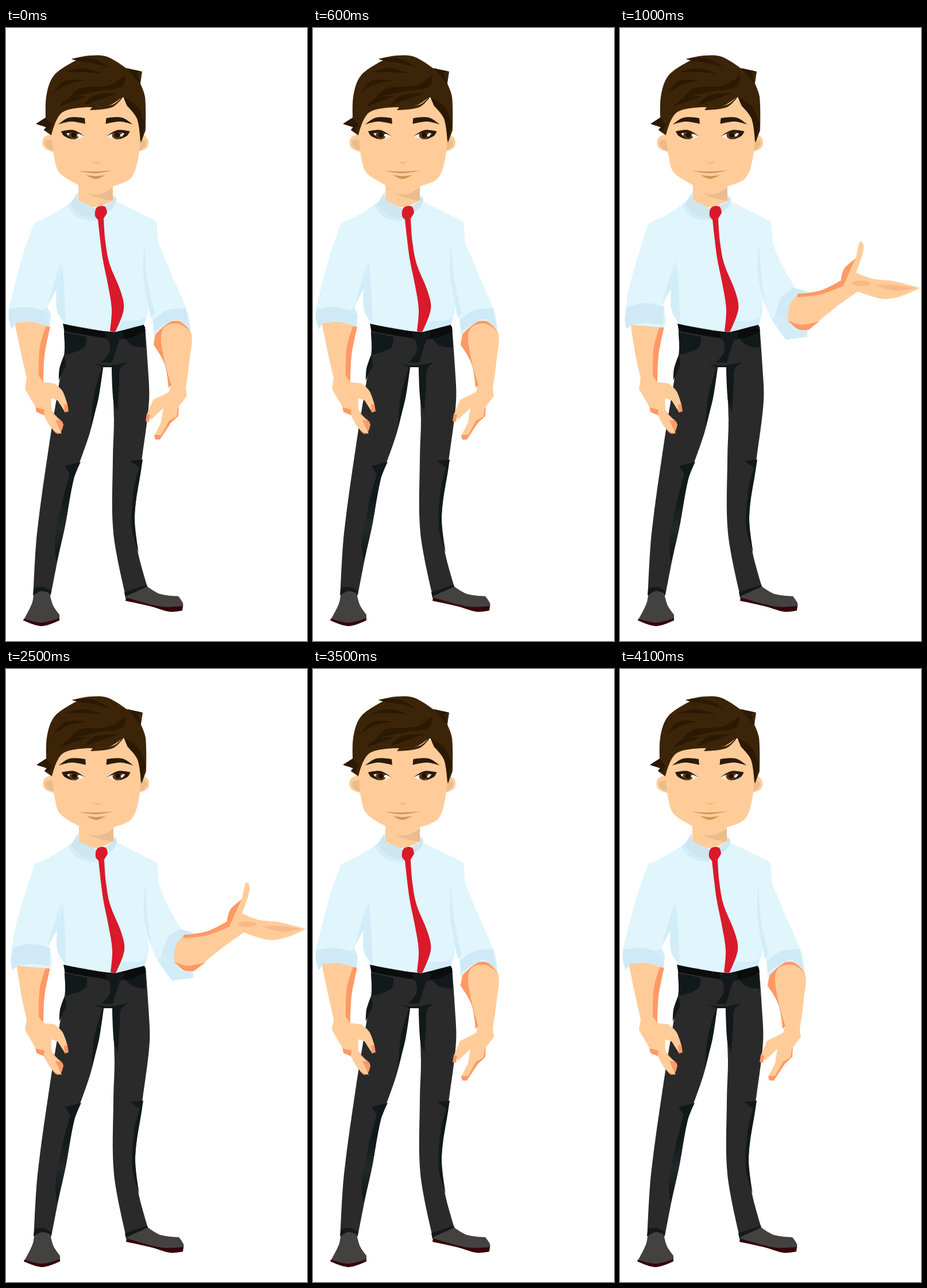
An HTML page with a canvas for the animation above (4500 ms loop, 524 by 1068 pixels).

```html
<!DOCTYPE html>
<html lang="en">
<head>
<meta charset="utf-8">
<title>Presenter</title>
<style>
html, body { margin: 0; width: 100%; height: 100%; overflow: hidden; background: #fff; }
canvas { display: block; }
</style>
</head>
<body>
<canvas id="stage" width="524" height="1068"></canvas>
<script>
const ctx = document.getElementById('stage').getContext('2d');

const SKIN = '#ffcc99', BLUSH = '#ff9966', TAN = '#e9bd8d', LIP = '#cf9656';
const SHIRT = '#e0f5fc', FOLD = '#d2edf8', CUFF = '#cfeaf6', COLLAR = '#cde6ef', TIE = '#d91a2b';
const CLOTH = '#2a2a2a', DEEP = '#11191b', BELT = '#0b0c0c', SHOE = '#444241', SOLE = '#35040a';
const HAIR = '#3c2408', LOCK = '#2b1904', BROW = '#2a1a0b';

const LOOP = 4500, RAISE = 1000, LOWER = 3500;

// Smooth closed outline through the points; "!" marks a sharp corner.
function blob(color, outline) {
  const pts = outline.split(' ').map(s => {
    const [x, y] = s.split(',').map(parseFloat);
    return { x, y, sharp: s.endsWith('!') };
  });
  const at = i => pts[(i + pts.length) % pts.length];
  const handle = (i, reach) => {
    const p = at(i), a = at(i - 1), b = at(i + 1);
    const k = p.sharp ? 0 : reach / (Math.hypot(b.x - a.x, b.y - a.y) || 1);
    return [p.x + (b.x - a.x) * k, p.y + (b.y - a.y) * k];
  };
  ctx.beginPath();
  ctx.moveTo(pts[0].x, pts[0].y);
  pts.forEach((p, i) => {
    const q = at(i + 1);
    const reach = Math.hypot(q.x - p.x, q.y - p.y) / 3;
    ctx.bezierCurveTo(...handle(i, reach), ...handle(i + 1, -reach), q.x, q.y);
  });
  ctx.fillStyle = color;
  ctx.fill();
}

function dot(color, x, y, rx, ry = rx) {
  ctx.fillStyle = color;
  ctx.beginPath();
  ctx.ellipse(x, y, rx, ry, 0, 0, Math.PI * 2);
  ctx.fill();
}

// Draws a part of the face, then the same part reflected.
function bothSides(part) {
  part();
  ctx.save();
  ctx.translate(311.5, 0);
  ctx.scale(-1, 1);
  part();
  ctx.restore();
}

function drawTorso() {
  blob(SKIN, '126,272! 126,300! 155,312 186,301! 186,274!');
  blob(TAN, '127,277! 158,290 186,278! 186,301! 155,294');
  blob(SHIRT, '112,305! 82,324 49,340! 60,430! 88,455! 88,490 104,517! 148,526 190,530! 240,518! 247,495 246,470! 262,440! 262,337! 191,302! 175,321! 157,330!');
  blob(FOLD, '97,403! 101,450 104,516! 90,495 88,455! 75,476! 84,442');
  blob(FOLD, '246,482! 239,506 203,510! 193,529! 240,518!');
  blob(FOLD, '112,304! 157,330! 158,336! 125,330 107,309!');
  blob(COLLAR, '125,286! 112,306! 130,324 157,332! 156,314! 126,300!');
  blob(COLLAR, '186,292! 192,298 187,312 175,321! 171,310! 186,302!');
  blob(TIE, '157,314 165,310 173,312 176,322! 170,332! 160,334! 155,327');
  blob(TIE, '160,333! 170,332! 173,372 180,410 200,460 205,490 190,530! 181,528! 184,490 177,445 168,400');
}

function drawLegs() {
  blob(CLOTH, '100,516! 102,560 92,622 76,720 54,880 48,978! 78,988! 90,926 104,862 115,795 125,765! 146,705 160,645 169,591! 180,530!');
  blob(CLOTH, '165,528! 169,591! 184,591! 188,680 186,750 187,880 209,992! 246,973! 229,910 224,850 236,755 249,650 247,590 242,520! 190,530!');
  blob(DEEP, '101,530! 140,538! 136,557 103,569!');
  blob(DEEP, '207,541! 242,528! 243,557! 220,553');
  blob(DEEP, '173,533! 205,532! 197,545 185,583! 166,583! 180,565 180,548!');
  blob(DEEP, '153,585! 180,588 212,582! 199,593 197,620 194,668! 187,650 184,591! 169,591! 161,645 148,694! 153,640 167,591!');
  blob(DEEP, '101,570! 104,587 98,600 92,614! 93,594');
  blob(DEEP, '216,754! 238,752! 236,765 224,850 231,914! 219,870 223,800 232,766!');
  blob(DEEP, '48,976! 64,974 78,981! 77,990! 47,988!');
  blob(DEEP, '206,983! 245,970! 247,977! 208,993!');
  const shin = ctx.createLinearGradient(0, 820, 0, 920);
  [DEEP, '#23282a', DEEP].forEach((c, i) => shin.addColorStop(i / 2, c));
  blob(shin, '102,763! 130,756! 118,786 103,866 88,930! 85,895 97,830 111,777!');
  blob(BELT, '99,515! 145,525 190,530! 240,517! 243,528! 215,540 180,541 102,528!');
  blob(DEEP, '173,531! 205,530! 203,543! 174,542!');

  blob(SHOE, '48,988! 62,981 76,985! 82,1006 93,1022! 93,1030! 62,1037 31,1031! 41,1012! 46,1000');
  blob(SHOE, '209,990! 246,973! 268,986 300,990! 308,1002 308,1009! 275,1012 209,996!');
  blob(SOLE, '31,1029! 62,1036 93,1028! 93,1032! 62,1042 30,1032!');
  blob(SOLE, '209,992! 270,1008 308,1007! 307,1015! 285,1017 250,1007 208,998!');
}

function drawHead() {
  bothSides(() => {
    blob(SKIN, '82,185! 66,191 66,208 87,217!');
    blob(TAN, '80,194! 68,198 73,210 86,214!');
  });
  blob(SKIN, '76,165! 80,190! 84,226 93,252 125,273! 138,285 155,290 172,285 188,275! 217,262 230,228 234,188! 240,140! 150,100! 84,130!');

  blob(HAIR, '70,173! 70,120 84,82 123,56! 114,54! 145,48 176,50 209,70! 237,76! 234,97! 242,120 243,178! 235,200! 230,160 204,120! 185,138 146,143! 150,138! 98,147 79,187! 66,178!');
  blob(LOCK, '52,167! 69,156! 79,168! 74,179! 66,177! 70,173!');
  blob(LOCK, '114,54! 150,53 181,70! 155,62 123,57!');
  blob(LOCK, '101,77! 133,70 168,79! 133,77');
  blob(LOCK, '83,113! 102,92 137,92! 108,98');
  blob(LOCK, '110,121! 128,105 180,100 208,82! 202,102 160,110');
  blob(LOCK, '92,137! 112,121 141,119!');
  blob(LOCK, '134,135! 155,117 193,114!');
  blob(LOCK, '211,70! 237,76! 229,77! 233,97! 224,86');
  blob(LOCK, '204,120! 230,138 242,168! 234,199! 228,158 211,136!');
  blob(SKIN, '158,138! 182,134 201,121! 187,133');

  bothSides(() => {
    blob(BROW, '91,168! 110,156 137,157! 138,167! 113,163');
    blob('#f7ece2', '101,183! 118,180 136,189! 118,194');
    dot('#5e3b18', 118, 187, 9, 7);
    dot('#211306', 118, 186.5, 4.5);
    blob(BROW, '96,180! 118,178 137,189! 120,182 105,184! 115,194! 101,188');
  });
  dot('#fff', 126, 187, 2.3);
  dot('#fff', 201, 187, 2.3);
  blob('#edb98b', '148,231! 157,234 166,231! 157,237');
  blob(LIP, '125,249! 156,250 187,248! 156,253');
  blob(LIP, '139,256! 156,258 173,256! 156,263');
}

// Hanging arm on the left; only the sleeve differs between the poses.
function drawLeftArm(raised) {
  const edge = raised ? 18 : 15;
  blob(BLUSH, '50,654! 53,669! 67,675! 78,695 92,707 100,690! 75,662!');
  blob(SKIN, edge + ',513! 45,510 77,520! 67,570 65,617! 84,619! 98,632 107,656! 102,668! 90,649! 79,645! 81,670 97,684! 86,683! 97,707! 83,701 66,675! 67,665! 52,661! 33,629! 36,610! 28,575');
  blob(BLUSH, '71,516! 77,520! 67,570 65,617! 57,606! 59,555');
  blob(BLUSH, '101,656! 107,655! 109,668! 102,670!');
  blob(BLUSH, '86,683! 98,685! 100,692! 92,694!');
  if (raised) {
    blob(SHIRT, '50,340! 17,448 8,510 12,525! 20,517! 77,522! 81,510! 75,482! 88,455! 100,400! 90,330!');
    blob(CUFF, '12,486! 45,479 77,486! 75,518! 45,514 20,517! 11,524! 9,509');
  } else {
    blob(SHIRT, '49,340! 29,397 5,490! 10,525! 17,514! 45,512 76,521! 78,500! 72,486! 88,455! 99,400! 90,330!');
    blob(CUFF, '5,490! 35,486 66,492! 76,520! 45,512 17,514! 10,525! 5,508');
    blob(FOLD, '65,491! 72,486! 78,501! 76,520!');
  }
  blob(FOLD, '97,403! 88,430 73,482! 88,455!');
}

function drawLoweredArm() {
  blob(BLUSH, '301,660! 300,676! 287,688! 268,717! 260,717! 258,710! 273,690!');
  blob(SKIN, '258,552! 265,522 300,510 322,530 320,575 313,628! 315,641! 299,662! 297,677! 284,684! 270,709! 259,709! 270,687! 274,662! 253,682! 245,674! 256,648! 284,634! 287,622! 275,580');
  blob(BLUSH, '257,552! 266,524 298,510 321,529! 298,515 273,525 273,565 288,622! 283,627! 276,585');
  blob(BLUSH, '245,672! 251,674! 249,686! 243,685!');
  blob(SHIRT, '262,337! 265,374! 291,436 317,497 321,527! 296,508 257,537! 254,505 247,470! 238,400! 240,330!');
  blob(FOLD, '241,375! 239,430 252,505! 259,497! 246,440');
  blob(CUFF, '256,509! 280,492 313,488! 321,527! 296,508 258,530!');
}

function drawRaisedArm() {
  blob(SHIRT, '263,337! 266,375! 283,415 306,454! 325,459! 326,538! 289,543! 264,508 247,468! 239,400! 241,330!');
  blob(FOLD, '242,375! 240,430 254,485! 247,440');
  blob(CUFF, '270,500! 282,468 302,453! 325,459! 308,466! 293,512!');
  blob(FOLD, '264,508! 279,498 305,527! 326,527! 326,538! 289,543!');
  blob(SKIN, '309,464! 350,458 386,441! 390,422 411,400! 415,380 420,372 424,385 411,426! 440,437 476,441 522,453! 490,467 458,472 414,459! 375,487 328,526! 293,512! 295,484');
  blob(BLUSH, '310,463! 350,457 386,439! 389,449! 350,464 308,469!');
  blob(BLUSH, '384,444! 390,420 410,402! 402,419 389,449!');
  blob(BLUSH, '293,510! 315,517 347,511! 328,526! 310,525');
  dot('#f8b989', 420, 445, 16, 5);
  blob('#f8b989', '445,448! 480,448 513,453! 480,458');
}

function draw(time) {
  const t = time % LOOP;
  const raised = t >= RAISE && t < LOWER;
  ctx.fillStyle = '#fff';
  ctx.fillRect(0, 0, 524, 1068);
  ctx.save();
  ctx.translate(raised ? 1 : 0, 0);
  drawTorso();
  drawLegs();
  drawHead();
  ctx.restore();
  drawLeftArm(raised);
  if (raised) drawRaisedArm();
  else drawLoweredArm();
}

let start;
function tick(now) {
  start ??= now;
  draw(now - start);
  requestAnimationFrame(tick);
}
draw(0);
requestAnimationFrame(tick);
</script>
</body>
</html>
```
